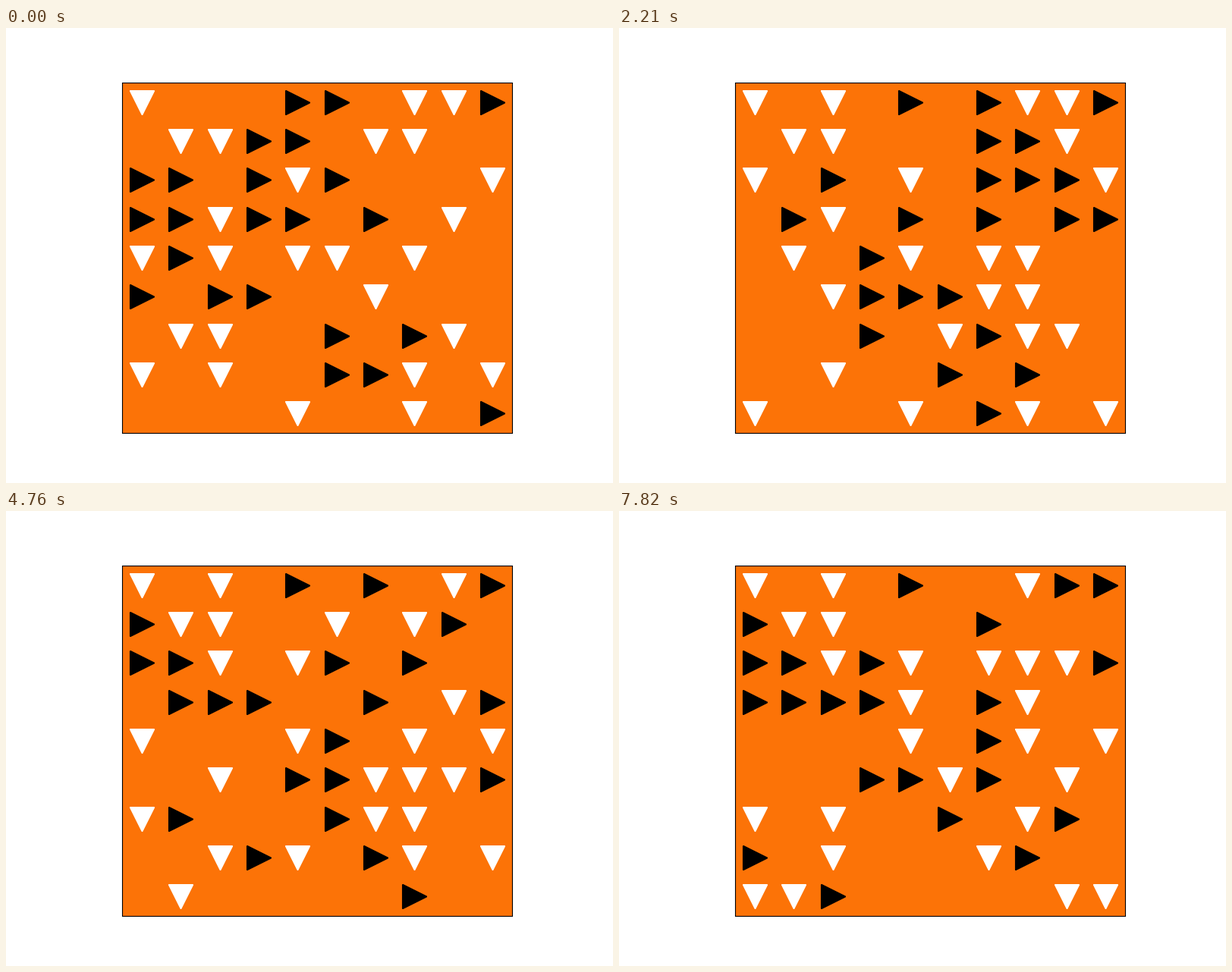
These frames come from a looping animation (800 px wide and 600 px high, 7.99 s). An HTML page with a canvas:

```html
<!DOCTYPE html>
<html lang="en">
<head>
<meta charset="utf-8">
<title>Two-way traffic automaton</title>
<style>
  html, body { margin: 0; width: 100%; height: 100%; overflow: hidden; background: #fff; }
  canvas { display: block; }
</style>
</head>
<body>
<canvas id="stage" width="800" height="600"></canvas>
<script>
const STEP_MS = 170, STEPS = 47, COLS = 10, ROWS = 9;
const LEFT = 460 / 3, TOP = 72, CELL = 154 / 3;
const HALF = Math.sqrt(500) / 2 * 100 / 72;   // half the marker size in pixels
const ctx = document.getElementById('stage').getContext('2d');

const start = [
  'v...>>.vv>',
  '.vv>>.vv..',
  '>>.>v>...v',
  '>>v>>.>.v.',
  'v>v.vv.v..',
  '>.>>..v...',
  '.vv..>.>v.',
  'v.v..>>v.v',
  '....v..v.>',
].map(row => [...row]);

// Every car of one kind moves into the next cell if it is free; edges wrap.
function advance(grid, car, dx, dy) {
  const next = grid.map(row => [...row]);
  grid.forEach((row, y) => row.forEach((cell, x) => {
    const nx = (x + dx) % COLS, ny = (y + dy) % ROWS;
    if (cell === car && grid[ny][nx] === '.') {
      next[y][x] = '.';
      next[ny][nx] = car;
    }
  }));
  return next;
}

// The two kinds take turns, rightward cars first.
const states = [start];
for (let i = 1; i < STEPS; i++) {
  const turn = i % 2 ? ['>', 1, 0] : ['v', 0, 1];
  states.push(advance(states[i - 1], ...turn));
}

function drawCar(car, col, row) {
  ctx.save();
  ctx.translate(Math.round(LEFT + CELL * (col + 0.5)) + 0.5,
                Math.round(TOP + CELL * (row + 0.5)) + 0.5);
  if (car === 'v') ctx.rotate(Math.PI / 2);
  ctx.fillStyle = ctx.strokeStyle = car === 'v' ? '#fff' : '#000';
  ctx.lineWidth = 1.5 * 100 / 72;
  ctx.lineJoin = 'round';
  ctx.beginPath();
  ctx.moveTo(HALF, 0);
  ctx.lineTo(-HALF, HALF);
  ctx.lineTo(-HALF, -HALF);
  ctx.closePath();
  ctx.fill();
  ctx.stroke();
  ctx.restore();
}

function draw(grid) {
  ctx.fillStyle = '#fff';
  ctx.fillRect(0, 0, 800, 600);
  ctx.fillStyle = '#fc7307';
  ctx.fillRect(153.5, 72.5, 514, 462);
  ctx.strokeStyle = '#000';
  ctx.lineWidth = 0.8 * 100 / 72;
  ctx.strokeRect(153.5, 72.5, 514, 462);
  grid.forEach((row, y) => row.forEach((cell, x) => {
    if (cell !== '.') drawCar(cell, x, y);
  }));
}

let startTime;
function tick(now) {
  startTime ??= now;
  draw(states[Math.floor((now - startTime) / STEP_MS) % STEPS]);
  requestAnimationFrame(tick);
}
draw(start);
requestAnimationFrame(tick);
</script>
</body>
</html>
```
